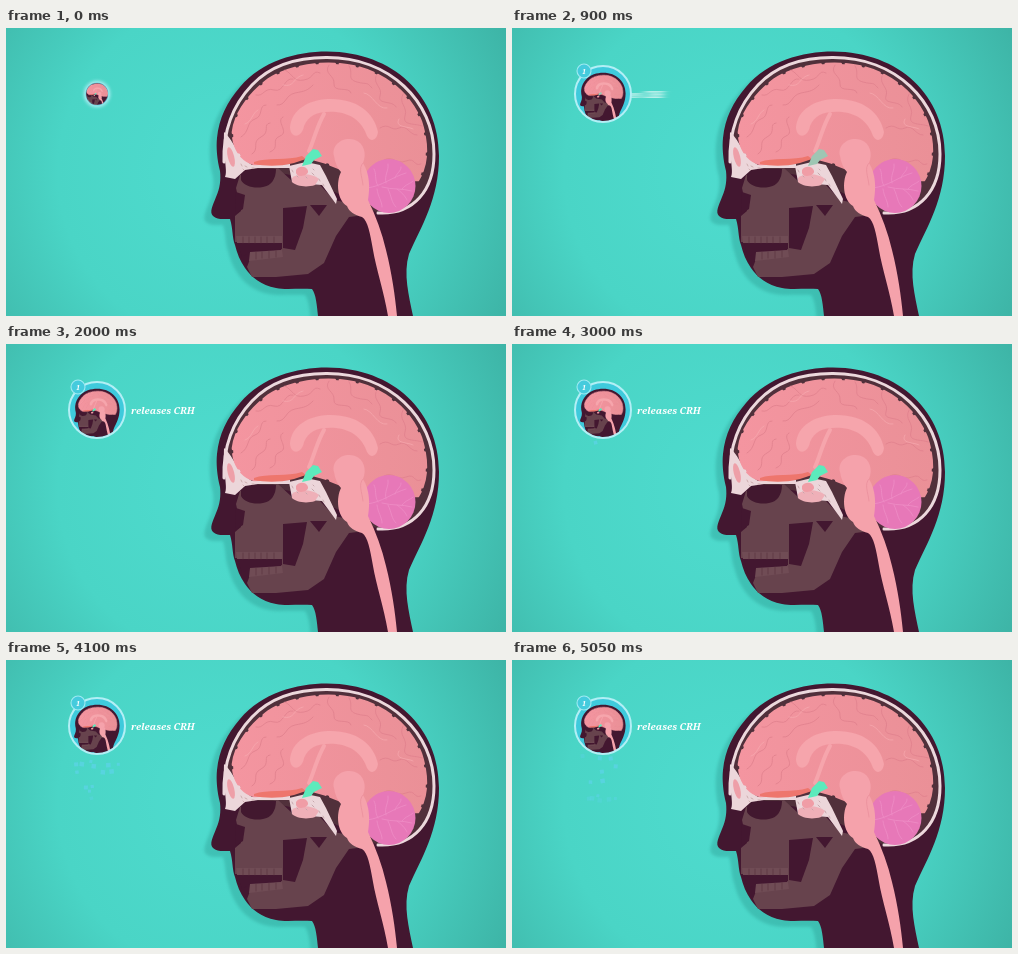
An HTML page for the animation above (5100 ms loop, 500 by 288 pixels).

```html
<!DOCTYPE html>
<html lang="en">
<head>
<meta charset="utf-8">
<title>CRH release</title>
<style>
html, body { margin: 0; width: 100%; height: 100%; overflow: hidden; background: #48cdbb; }
svg { display: block; width: 500px; height: 288px; }
text { font: italic bold 9.6px "Noto Serif", "Liberation Serif", serif; fill: #fff; }
.line { fill: none; stroke-linecap: round; stroke-linejoin: round; }
.fine { opacity: var(--fine, 1); }
</style>
</head>
<body>
<svg id="stage" viewBox="0 0 500 288">
  <defs>
    <radialGradient id="sky" gradientUnits="userSpaceOnUse" cx="225" cy="144" r="315">
      <stop offset="0" stop-color="#4fdccf"/>
      <stop offset=".55" stop-color="#4ad5c6"/>
      <stop offset="1" stop-color="#3db3a5"/>
    </radialGradient>
    <linearGradient id="pink" gradientUnits="userSpaceOnUse" x1="226" y1="0" x2="422" y2="0">
      <stop offset="0" stop-color="#f495a0"/>
      <stop offset="1" stop-color="#ea9097"/>
    </linearGradient>
    <filter id="soft" x="-20%" y="-20%" width="140%" height="140%"><feGaussianBlur stdDeviation="1.5"/></filter>
    <filter id="streak" filterUnits="userSpaceOnUse" x="0" y="50" width="260" height="30">
      <feGaussianBlur id="blur" stdDeviation="0 0"/>
    </filter>
    <clipPath id="disc"><circle id="lens"/></clipPath>
    <clipPath id="exit"><rect x="118" y="50" width="120" height="30"/></clipPath>

    <path id="profile" d="M312 288C311 278 310 266 306 261C292 260 280 262 270 260C255 257 245 249 239 240C234 233 231 225 229 217C226 210 227 200 224 191C217 191 211 192 207 188C203 184 207 177 210 169C214 160 215 152 214 143C211 132 210 119 211 110C213 90 221 74 234 59C256 33 290 23.500 321 23.500C388 24 433 68 433 128C433 171 415 199 403 226C397 246 403 268 407 288Z"/>
    <path id="cortex" d="M248 136C235 132 227 120 227 104C229 85 244 65 263 51C283 39 307 35 329 36C372 38 403 63 415 94C422 116 422 136 412 152L380 152L346 145L318 134L300 129L270 135Z"/>

    <g id="head">
      <use href="#profile" fill="#431730"/>
      <path class="fine" d="M218 134C217 104 226 78 246 57C264 38 290 29.500 320 29.500C384 29 428 74 428 126C428 162 408 187 372 185L300 150Z" fill="#51303b"/>

      <g fill="#67434d">
        <path d="M234 147L272 140L286 153L314 157L328 172L352 177L367 186L343 189L330 208L318 235L302 246L270 249L246 249L241 239L246 226L275 222L276 214L229 214L229 188L235 183L230 160Z"/>
        <path d="M235 141H270C270 151 265 158 257 159C248 161 238 158 235 152Z" fill="#42182f"/>
        <path d="M230 164L239 167L237 181L229 186Z" fill="#431730"/>
        <path d="M277 180L301 178L297 200L289 222L277 220Z" fill="#431730"/>
        <path d="M304 177L321 177L313 188Z" fill="#431730"/>
        <path d="M231 212H276V221L246 223L236 229Z" fill="#431730"/>
        <path d="M230 208L276 208L276 215L231 215Z M244 224L276 222L277 229L243 233Z" fill="#704c55"/>
        <path class="line" d="M237 209V215M243 209V215M249 209V215M255 209V215M261 209V215M268 209V215M250 224V231M256 224V230M263 223V230M270 223V229" stroke="#593641" stroke-width=".7"/>
      </g>

      <g class="fine">
        <path class="line" d="M218 134C217 104 226 78 246 57C264 38 290 29.500 320 29.500C384 29 428 74 428 126C428 162 408 187 372 185" stroke="#ecd8dc" stroke-width="3"/>
        <path d="M218 104C226 110 231 127 246 137L284 136V140L252 140L239 142L229 151L219 149C222 143 217 130 218 104Z" fill="#ecd6da"/>
        <ellipse cx="225" cy="129" rx="3.200" ry="10" transform="rotate(-14 225 129)" fill="#ee9fa8"/>
        <path class="line" d="M235 136l1 2m3 0l2 1m-4 2l1 1m8-2l2 0" stroke="#c9a9aa" stroke-width=".9"/>
      </g>

      <use href="#cortex" fill="url(#pink)"/>
      <use href="#cortex" class="line" stroke="url(#pink)" stroke-width="2.600" stroke-dasharray="15 5"/>
      <g class="line" stroke="#e0808d" stroke-width=".8">
        <path d="M235 109C244 104 240 94 249 91S252 77 260 77M246 126C254 121 245 114 255 109S256 96 264 95M250 67C258 69 258 59 268 62S278 49 287 51M264 124C275 120 264 112 274 108S269 93 277 89M279 42C288 47 287 54 298 52S306 41 314 45M271 77C280 78 279 67 289 65S301 63 307 57M323 37C317 46 329 47 328 56S344 58 345 65M343 38C348 45 340 51 351 54S360 53 366 60M370 48C367 57 377 59 374 68S387 72 390 79M397 66C392 76 402 78 399 88S409 95 416 98M374 100C383 94 385 104 393 100S403 107 411 107M378 132C387 127 390 137 400 133S407 139 415 136"/>
      </g>
      <path class="line" d="M239 96C246 94 246 85 252 82M277 57C289 60 287 49 297 47M358 65C367 66 371 82 381 80M393 91C388 100 402 98 407 101" stroke="#f6abb0" stroke-width=".7"/>

      <path d="M284 100C285 82 302 72 322 71C350 70 368 84 372 104C371 112 365 115 361 108C357 96 348 86 330 84C312 83 303 87 298 98C296 110 285 111 284 100Z" fill="#f6a5ac"/>
      <path class="line" d="M318 86C311 98 308 112 303 123" stroke="#f6a5ac" stroke-width="4"/>

      <path d="M248 134C260 129 282 133 296 128L300 131L288 135C272 139 258 138 248 136Z" fill="#ee766d"/>
      <g class="fine">
        <path d="M283 138L300 134L314 137L320 148L331 171L330 176L316 157L302 156L286 154Z" fill="#ecd6da"/>
        <path d="M286 150C292 145 306 145 313 151L309 157C300 160 290 158 286 154Z" fill="#efb0b8"/>
        <path class="line" d="M286 142l1 2m4 4l1 1m8 0l1 1m5-5l2 2m-1-6l1 1m5 9l1 2m3 3l1 2" stroke="#c4a4aa" stroke-width=".9"/>
      </g>
      <path d="M290 142C293 137 301 138 302 143S291 150 290 145Z" fill="#f09da6"/>

      <g class="fine">
        <ellipse cx="383" cy="158" rx="26.500" ry="27" fill="#e778b8"/>
        <path class="line" d="M361 160C377 158 386 149 400 145M372 158C368 151 371 146 368 141M380 155C378 147 383 143 382 136M389 150C391 144 395 144 395 139M376 159C387 162 395 160 406 163M382 161C386 169 385 174 390 179M391 161C398 166 400 170 401 172M371 161C372 169 376 173 376 179M396 161C400 156 404 156 407 153" stroke="#ee8cc5" stroke-width=".9"/>
      </g>

      <path d="M328 128C325 117 337 108 349 112C358 115 361 126 357 135C364 146 364 160 362 172C370 188 376 205 380 222C386 246 389 267 391 288H382C378 264 370 240 367 222C364 205 362 193 356 189C349 187 343 184 341 178C331 172 330 154 335 144C331 140 329 134 328 128Z" fill="#f5a2ab"/>
      <path class="line" d="M357 135C352 140 356 148 357 157" stroke="#ea909c" stroke-width=".8"/>

      <path d="M300 128L307 121L312 122L316 128L308 132L305 136L296 138Z" fill="currentColor"/>
    </g>
  </defs>

  <rect width="500" height="288" fill="url(#sky)"/>
  <use href="#profile" transform="translate(-7 6)" fill="#17766f" opacity=".24" filter="url(#soft)"/>
  <use href="#head"/>

  <g id="drops" fill="#5cd3e8"></g>

  <g clip-path="url(#exit)"><g filter="url(#streak)"><text id="label" x="125" y="69.500">releases CRH</text></g></g>

  <circle id="glow" fill="none" stroke="#b4f0f6" stroke-width="4" filter="url(#soft)"/>
  <g id="badge">
    <circle id="plate" fill="#3ecadc"/>
    <g clip-path="url(#disc)"><g id="mini" style="--fine:0"><use href="#head" transform="translate(-64 -26) scale(.2)"/></g></g>
    <circle id="ring" fill="none" stroke="#b2eff5" stroke-width="2"/>
  </g>
  <g id="number">
    <circle r="7" fill="#45cbdd" stroke="#9feaf2" stroke-width="1.100"/>
    <text y="2.600" text-anchor="middle" style="font-size:7px">1</text>
  </g>
</svg>
<script>
const LOOP = 5100;
const $ = id => document.getElementById(id);
const clamp = v => Math.max(0, Math.min(1, v));
const ramp = (t, a, b) => clamp((t - a) / (b - a));
const smooth = p => p * p * (3 - 2 * p);
const easeOut = p => 1 - (1 - p) ** 3;
const mix = (a, b, p) => a + (b - a) * p;

function along(steps, t) {
  for (let i = 1; i < steps.length; i++) {
    const [t0, v0] = steps[i - 1], [t1, v1] = steps[i];
    if (t <= t1) return mix(v0, v1, smooth(ramp(t, t0, t1)));
  }
  return steps[steps.length - 1][1];
}

const ringSteps = [[0, 11.5], [300, 32], [560, 28]];
const miniSteps = [[0, .55], [300, 1]];
const riseSteps = [[0, 66], [300, 64.5], [560, 66]];

// birth time, start x, size
const drops = [
  [2860, 83, 3.5], [3170, 76, 4], [3190, 85, 3.2], [3070, 81, 3],
  [3590, 67, 3.5], [3600, 99, 4.5], [3610, 109, 4.5], [3770, 88, 4.5],
  [3810, 68, 4], [3830, 75, 4.5], [3790, 104, 4.5], [3900, 85, 3],
  [3815, 115, 3], [4290, 91, 4.5], [4270, 75, 3.5], [4550, 90, 4],
  [4710, 106, 4], [4920, 99, 4], [4940, 88, 4], [4990, 70, 4]
].map(([born, x, size], i) => {
  const el = document.createElementNS("http://www.w3.org/2000/svg", "rect");
  el.setAttribute("width", size);
  el.setAttribute("height", size);
  $("drops").append(el);
  return { born, x, size, el, tilt: i * 37 % 24 - 12 };
});

function set(id, attrs) {
  for (const key in attrs) $(id).setAttribute(key, attrs[key]);
}

function pulse(t) {
  const phase = ((t - 150) / 1020 + 5.5) % 1 - .5;
  const p = smooth(ramp(Math.abs(phase), .28, .21));
  const dim = [168, 192, 178], lit = [92, 234, 188];
  return `rgb(${dim.map((v, i) => Math.round(mix(v, lit[i], p)))})`;
}

function draw(t) {
  $("stage").style.color = pulse(t);

  const r = along(ringSteps, t);
  const cy = along(riseSteps, t);
  set("badge", { transform: `translate(91 ${cy})` });
  set("plate", { r });
  set("lens", { r: r - .5 });
  set("ring", { r, opacity: mix(.3, 1, ramp(t, 0, 300)) });
  set("mini", { transform: `scale(${along(miniSteps, t)})` });
  set("glow", { cx: 91, cy, r, opacity: .75 * (1 - ramp(t, 150, 560)) });

  const n = easeOut(ramp(t, 220, 580));
  set("number", { transform: `translate(${mix(67, 72, n)} 43) scale(${n})`, opacity: n });

  const slide = easeOut(ramp(t, 820, 1200));
  set("label", {
    transform: `translate(${mix(-76, 0, slide)} 0)`,
    opacity: ramp(t, 820, 900)
  });
  set("blur", { stdDeviation: `${(8 * (1 - slide)).toFixed(2)} 0` });

  for (const d of drops) {
    const age = (t - d.born) / 1000;
    const x = 88 + (d.x - 88) * (1 - .35 * age) - d.size / 2;
    const y = 94 + 36 * age - d.size / 2;
    const alpha = age < 0 ? 0 : .7 * ramp(age, 0, .12) * ramp(age, 1.42, 1.1);
    d.el.setAttribute("transform", `translate(${x} ${y}) rotate(${d.tilt})`);
    d.el.setAttribute("opacity", alpha);
  }
}

const start = performance.now();
function tick() {
  draw((performance.now() - start) % LOOP);
  requestAnimationFrame(tick);
}
draw(0);
requestAnimationFrame(tick);
</script>
</body>
</html>
```
